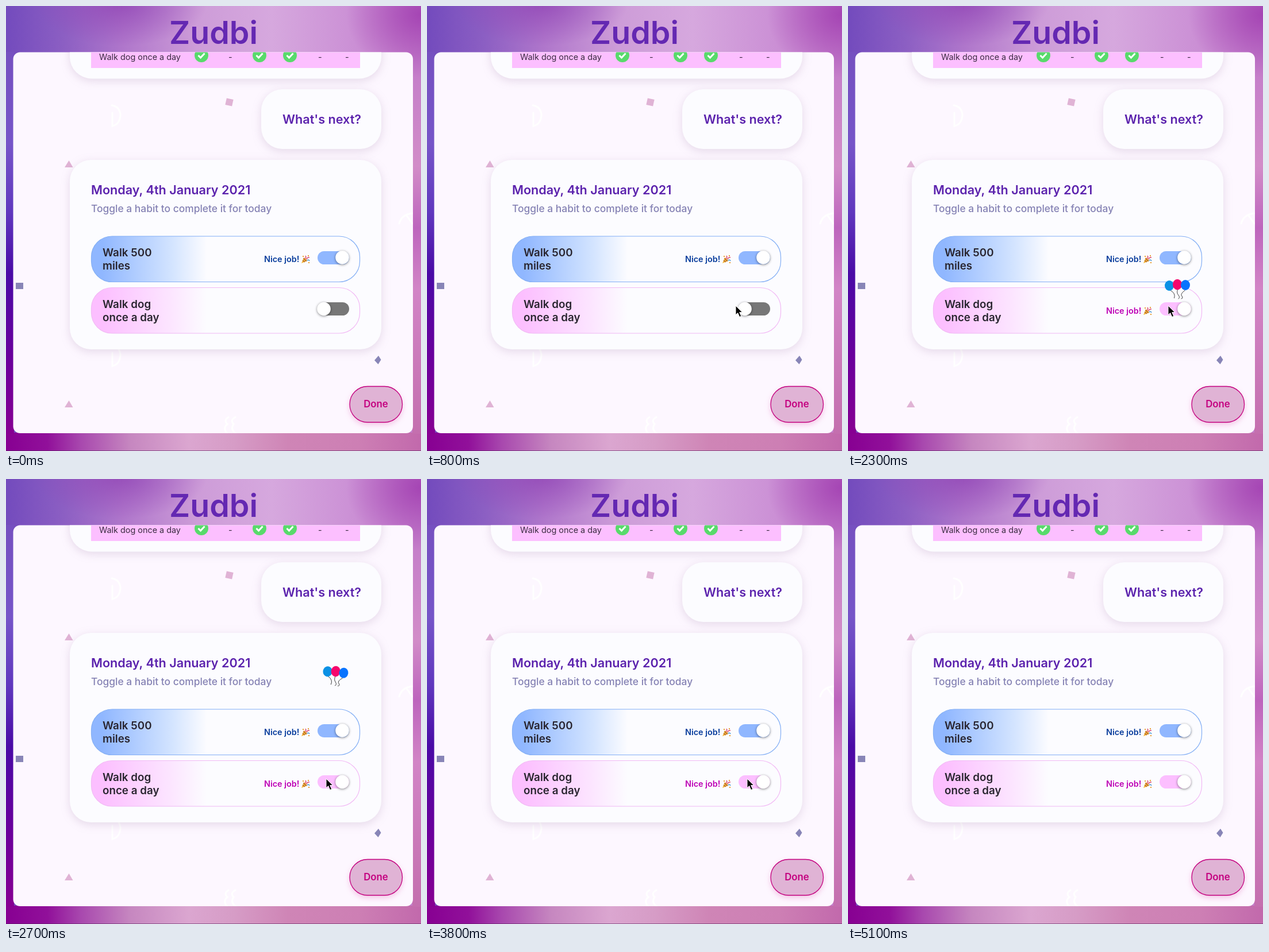
An HTML page that plays this animation: 722x775 px, repeating every 5.2 s.

```html
<!DOCTYPE html>
<html lang="en">
<head>
<meta charset="utf-8">
<title>Habit tracker</title>
<style>
  html, body { margin: 0; width: 100%; height: 100%; overflow: hidden; }
  body {
    background:
      radial-gradient(150px 75px at 200px -5px, #8f42b4c0, #8f42b400),
      radial-gradient(130px 110px at 722px 15px, #a545b4, #a545b400),
      linear-gradient(#7650c0, #7655c8 24%, #6038be 42%, #4a0ba6 58%, #6a009c 80%, #870092) 0 80px / 14px 665px no-repeat,
      linear-gradient(#c27cca, #d28cc8 30%, #bd65bd 46%, #d284c6 62%, #c46fae) 707px 80px / 15px 665px no-repeat,
      linear-gradient(90deg, #870092, #91109a 10%, #a848ae 18%, #c687c0 30%, #dba6d0 44%, #d69cc6 55%, #cf85b6 68%, #cd7fb4 85%, #c269ac) 0 743px / 722px 32px no-repeat,
      linear-gradient(90deg, #734bbd, #8c5fc3 14%, #af76cb 28%, #cd9cd8 46%, #d6a8de 64%, #cc92d6 82%, #c27cca);
  }
  svg { display: block; font-family: Inter, sans-serif; font-weight: 600; }
  .card { fill: #fcfcff; filter: drop-shadow(0 4px 8px #80588a30); }
  .purple { fill: #5b22ad; font-size: 21.6px; }
  .habit { fill: #29252f; font-size: 18.8px; }
  .praise { font-size: 14.4px; }
  .knob { fill: #fff; filter: drop-shadow(0 1px 2px #0007); }
  .faint { fill: none; stroke: #fff; stroke-width: 3; stroke-linecap: round; }
</style>
</head>
<body>
<svg width="722" height="775" viewBox="0 0 722 775">
  <defs>
    <clipPath id="panelClip"><rect x="12.5" y="80.5" width="695.5" height="663.5" rx="12"/></clipPath>
    <linearGradient id="blueFade">
      <stop offset=".04" stop-color="#90b7ff"/><stop offset=".3" stop-color="#d3e4ff"/><stop offset=".43" stop-color="#fcfcff"/>
    </linearGradient>
    <linearGradient id="pinkFade">
      <stop offset=".04" stop-color="#fcbfff"/><stop offset=".3" stop-color="#fce6ff"/><stop offset=".43" stop-color="#fcfcff"/>
    </linearGradient>
    <g id="check">
      <circle r="12" fill="#58da6b"/>
      <path d="M-5.5 0l4 4 7-7.5" fill="none" stroke="#fff" stroke-width="3"/>
    </g>
    <g id="popper">
      <path d="M0 14L4 4Q9 6 10 10z" fill="#f4b63c"/>
      <path d="M2 9l4 3M3.5 5.5l5 5" stroke="#a85c28" stroke-width="1.3"/>
      <path d="M6 6Q9 4 7 1M8.5 7Q11 3 14 4" fill="none" stroke="#dc4c73" stroke-width="1.5"/>
      <path d="M9.5 9Q13 7 14 10" fill="none" stroke="#4c9bd8" stroke-width="1.5"/>
      <path d="M2 2h2M11 1h2M12 13h2" stroke="#e89b30" stroke-width="2"/>
    </g>
  </defs>

  <text x="361" y="66" text-anchor="middle" font-size="55.5" fill="#6428b2">Zudbi</text>
  <rect y="774" width="722" height="1" fill="#54205c" opacity=".55"/>
  <rect x="12.5" y="80.5" width="695.5" height="663.5" rx="12" fill="#fdf7ff"/>

  <g clip-path="url(#panelClip)">
    <g class="faint">
      <path id="half" d="M184 173Q198 175 199 190Q198 206 185 209V186"/>
      <use href="#half" y="418"/>
      <path d="M684 379Q688 363 707 361M697 365l10 14"/>
      <path d="M387 716Q378 722 385 728Q377 735 384 744M399 716Q389 722 396 728Q390 737 399 744"/>
    </g>
    <g fill="#e0b3d5">
      <rect x="-6" y="-6" width="12" height="12" transform="translate(388.5 167.5) rotate(12)"/>
      <path id="tri" d="M102 281l7.5-12 7 12z"/>
      <use href="#tri" y="418"/>
    </g>
    <path d="M17 482h13v11H17zM648 609l4.5 7-5 8-6.5-7z" fill="#8885b7"/>

    <rect class="card" x="111" y="20" width="542" height="106.5" rx="38"/>
    <path d="M148 80h468v28H148z" fill="#fcbfff"/>
    <g fill="#3a2b40" font-size="14.4" font-weight="400">
      <text x="162" y="94">Walk dog once a day</text>
      <text x="387" y="94">-</text><text x="543" y="94">-</text><text x="590" y="94">-</text>
    </g>
    <use href="#check" x="340" y="86"/><use href="#check" x="441" y="86"/><use href="#check" x="494" y="86"/>

    <rect class="card" x="444" y="145" width="209" height="104" rx="37"/>
    <text class="purple" x="481" y="205">What's next?</text>

    <rect class="card" x="111" y="268" width="542" height="330" rx="37"/>
    <text class="purple" x="148" y="328">Monday, 4th January 2021</text>
    <text x="148" y="359" font-size="17.4" font-weight="500" fill="#8582b4">Toggle a habit to complete it for today</text>

    <rect x="148.5" y="401" width="467" height="79.5" rx="36" fill="url(#blueFade)" stroke="#84aff5" stroke-width="1.2"/>
    <text class="habit"><tspan x="168" y="436">Walk 500</tspan><tspan x="168" y="459">miles</tspan></text>
    <text class="praise" x="449" y="446" fill="#083c9c">Nice job!</text>
    <use href="#popper" x="514" y="434"/>
    <rect x="542" y="427" width="55" height="23" rx="11.5" fill="#90b7ff"/>
    <circle class="knob" cx="585" cy="438" r="11.8"/>

    <rect x="148.5" y="490.5" width="467" height="79.5" rx="36" fill="url(#pinkFade)" stroke="#f2b9f5" stroke-width="1.2"/>
    <text class="habit"><tspan x="168" y="526">Walk dog</tspan><tspan x="168" y="549">once a day</tspan></text>
    <g id="praise">
      <text class="praise" x="449" y="536" fill="#bd00b5">Nice job!</text>
      <use href="#popper" x="514" y="524"/>
    </g>
    <rect id="track" x="542" y="516" width="55" height="23" rx="11.5"/>
    <circle id="knob" class="knob" cy="527.5" r="11.8"/>

    <rect x="598" y="662.5" width="91.5" height="62.5" rx="31" fill="#e0b3d5" stroke="#c4007f" stroke-width="1.3" style="filter: drop-shadow(0 4px 5px #e060b050)"/>
    <text x="643.5" y="699" text-anchor="middle" font-size="16.8" fill="#c4007f">Done</text>
  </g>

  <g id="balloons">
    <path d="M-13 9Q-3 14-6 23M0 7Q-2 14 1 17Q5 22 1 24M13 9Q3 16 8 20Q10 23 6 24" fill="none" stroke="#333" stroke-width=".9"/>
    <ellipse cx="-14.5" cy="1" rx="8" ry="9" fill="#0b91e5"/>
    <ellipse cx="-.5" cy="-1" rx="8" ry="9.3" fill="#f6066d"/>
    <ellipse cx="13.5" cy="0" rx="8" ry="9" fill="#0874ff"/>
  </g>

  <g id="cursor" stroke-linejoin="round">
    <path id="arrow" d="M0 0v16l3.7-3.5 3 7 3-1.3-3-6.7h5z" fill="#000" stroke="#fff" stroke-width="1"/>
    <g id="hand">
      <path d="M-1.5 3Q0 .5 2 3V8.5Q4 6.5 5.5 9Q7.5 7.5 9 10Q12 9 12 12V16L10 19.5V21H1V19L-4.5 12.5Q-4.500 9.5-1.5 12z" fill="#fff" stroke="#000" stroke-width="1.2"/>
      <path d="M3 13v5M5.5 13v5M8 13v5" stroke="#000" stroke-width="1"/>
    </g>
  </g>
</svg>
<script>
  const LOOP = 5200, STEP = 100;
  const el = id => document.getElementById(id);
  const show = (id, on) => el(id).setAttribute('display', on ? 'inline' : 'none');
  const set = (id, name, value) => el(id).setAttribute(name, value);
  const progress = (t, from, to) => Math.min(1, Math.max(0, (t - from) / (to - from)));
  const ease = p => p * p * (3 - 2 * p);

  function render(time) {
    const t = Math.floor(time % LOOP / STEP) * STEP;

    const on = ease(progress(t, 1800, 2100));
    const channel = (off, end) => Math.round(off + (end - off) * on);
    set('knob', 'cx', 553 + 32 * on);
    set('track', 'fill', `rgb(${channel(119, 252)},${channel(119, 191)},${channel(119, 255)})`);
    show('praise', t >= 2000);

    const approach = progress(t, 600, 800), settle = ease(progress(t, 800, 1200));
    const x = 470 + 67 * approach + 20 * settle, y = 540 - 18 * approach;
    const pointing = x > 541 && t < 2100;
    set('cursor', 'transform', `translate(${x} ${y})`);
    show('cursor', t >= 600 && t < 4600);
    show('hand', pointing);
    show('arrow', !pointing);

    const flight = (t - 2300) / 800;
    set('balloons', 'transform', `translate(${573.5 + flight} ${486 - 300 * flight}) rotate(${14 * flight})`);
    show('balloons', t >= 2200 && t < 3800);
  }

  const start = performance.now();
  function tick() {
    render(performance.now() - start);
    requestAnimationFrame(tick);
  }
  tick();
</script>
</body>
</html>
```
